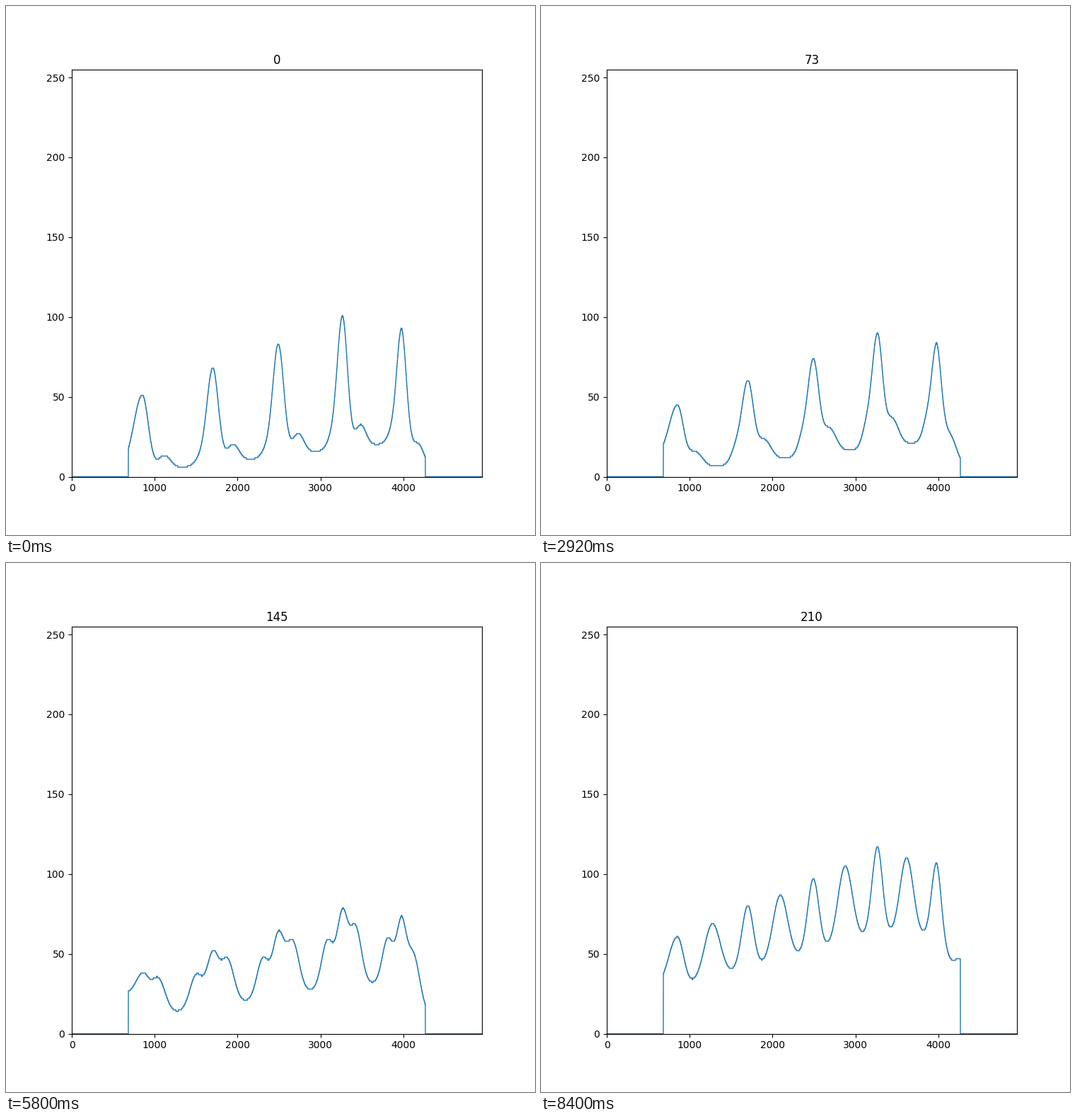
A matplotlib script that plays this animation: 748x748 px, repeating every 8440 ms.

```python
import numpy as np
import matplotlib.pyplot as plt
from matplotlib.animation import FuncAnimation

FRAMES, INTERVAL = 211, 40
SIZE, DPI = 748, 100
WIDTH, LEFT, RIGHT = 4950, 683, 4265

# Fixed main peaks, their heights over a slowly rising base.
PEAKS = [850, 1700, 2490, 3265, 3980]
HEIGHTS = [48, 60, 70, 83, 71]
MAIN_SIGMA = 0.085

# Each peak carries a bump on either side; offsets and widths are in peak spacings.
# floor, main, (right bump: height, offset, width), (left bump: same)
POSES = {
    0:   (0.00, 1.00, 0.17, 0.31, 0.09, 0.06, 0.19, 0.07),
    93:  (0.03, 0.58, 0.27, 0.15, 0.13, 0.29, 0.14, 0.07),
    145: (0.15, 0.53, 0.45, 0.22, 0.10, 0.37, 0.235, 0.09),
    184: (0.43, 0.51, 0.28, 0.33, 0.075, 0.26, 0.345, 0.075),
    210: (0.55, 0.65, 0.345, 0.45, 0.10, 0.345, 0.46, 0.10),
}
TIMES = list(POSES)
HOLD_END = TIMES[1]

x = np.arange(WIDTH)
inside = (x >= LEFT) & (x <= RIGHT)
at = x[inside]
phase = np.interp(at, [-350, *PEAKS, 4680], np.arange(-1, 6))
base = np.interp(at, [PEAKS[0], PEAKS[-1], RIGHT], [3, 22, 8])
gain = np.interp(at, [*PEAKS, RIGHT], [*HEIGHTS, 45])


def bell(d, sigma):
    return np.exp(-0.5 * (d / sigma) ** 2)


def pose(n):
    if n < HOLD_END:
        n = HOLD_END * (n / HOLD_END) ** 4  # barely moves at first
    return [np.interp(n, TIMES, track) for track in zip(*POSES.values())]


def profile(n):
    floor, main, rh, rd, rw, lh, ld, lw = pose(n)
    level = np.full(len(at), floor)
    for k in range(len(PEAKS)):
        d = phase - k
        level += main * bell(d, MAIN_SIGMA) + rh * bell(d - rd, rw) + lh * bell(d + ld, lw)
    y = np.zeros(WIDTH)
    y[inside] = np.round(base + gain * level)
    return y


fig, ax = plt.subplots(figsize=(SIZE / DPI, SIZE / DPI), dpi=DPI)
fig.subplots_adjust(left=93 / SIZE, right=0.9, bottom=0.11, top=0.88)
ax.set_xlim(0, WIDTH)
ax.set_ylim(0, 255)
line, = ax.plot(x, profile(0), linewidth=1)
title = ax.set_title("0", pad=5.5)


def update(n):
    line.set_ydata(profile(n))
    title.set_text(str(n))
    return line, title


anim = FuncAnimation(fig, update, frames=FRAMES, interval=INTERVAL, repeat=True)
plt.show()
```
